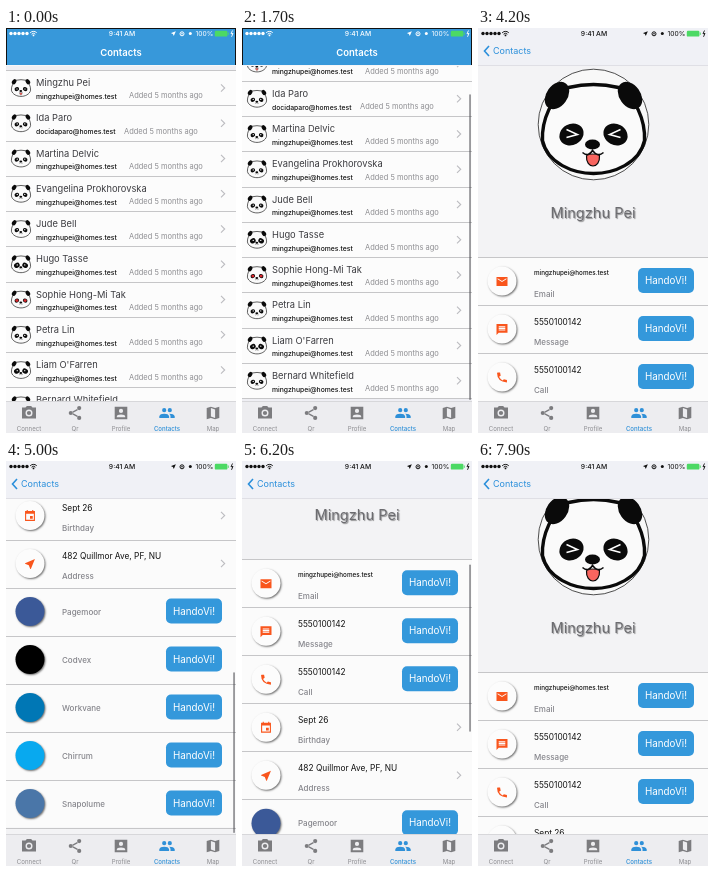
These frames come from a looping animation (230x405 px, 8000 ms). An HTML page with a canvas:

```html
<!DOCTYPE html>
<html lang="en">
<head>
<meta charset="utf-8">
<title>Contacts</title>
<style>
  html, body { margin: 0; width: 100%; height: 100%; overflow: hidden; background: #fff; }
  canvas { display: block; width: 230px; height: 405px; }
</style>
</head>
<body>
<canvas id="stage"></canvas>
<script>
const W = 230, H = 405, TOP = 38, BOTTOM = 373, VIEW = BOTTOM - TOP, LOOP = 8000;
const BLUE = '#3498db', ORANGE = '#f9551c', INK = '#0a0a0a';
const canvas = document.getElementById('stage');
const ctx = canvas.getContext('2d');
const dpr = window.devicePixelRatio || 1;
canvas.width = W * dpr;
canvas.height = H * dpr;

const ICONS = {
  camera: 'M9 2 7 4H2V20H22V4H17L15 2ZM7 12a5 5 0 1 0 10 0a5 5 0 1 0-10 0ZM9 12a3 3 0 1 0 6 0a3 3 0 1 0-6 0Z',
  share: 'M3 12a3 3 0 1 0 6 0a3 3 0 1 0-6 0ZM15 5a3 3 0 1 0 6 0a3 3 0 1 0-6 0ZM15 19a3 3 0 1 0 6 0a3 3 0 1 0-6 0ZM8.5 10 15 6.3 15.9 8 9.4 11.8ZM9.4 12.2 15.9 16 15 17.7 8.5 14Z',
  account: 'M3 3H21V21H3ZM9 9a3 3 0 1 0 6 0a3 3 0 1 0-6 0ZM6 18V17Q6 14 12 14T18 17V18Z',
  people: 'M5 8a3 3 0 1 0 6 0a3 3 0 1 0-6 0ZM13 8a3 3 0 1 0 6 0a3 3 0 1 0-6 0ZM1 19V16.5Q2 13 8 13T15 16.5V19ZM17 19V16.5Q17 14 15 13Q22 13 23 16.5V19Z',
  map: 'M3 5 9 3 15 5 21 3V19L15 21 9 19 3 21ZM9 5V17L15 19V7Z',
  mail: 'M2 4H22V20H2ZM4 6V8L12 13 20 8V6L12 11Z',
  message: 'M2 2H22V18H6L2 22ZM6 6V8H18V6ZM6 9V11H18V9ZM6 12V14H18V12Z',
  phone: 'M4 3H8.5L9.6 8.6 6.6 10.8Q9 15.3 13.2 17.4L15.4 15.2 21 16.5V21Q3 20 3 4Z',
  event: 'M6 1H8V3H16V1H18V3H21V21H3V3H6ZM5 8V19H19V8ZM12 12H17V17H12Z',
  near: 'M21 3 3 10.5V11.5L9.8 14.2 12.5 21H13.5Z'
};
const HEAD = new Path2D('M-25-37Q0-43 25-37C42-28 52-4 51 16C46 39 20 49 0 49C-20 49-46 39-51 16C-52-4-42-28-25-37Z');

const MAIL = 'mingzhupei@homes.test';
const PEOPLE = [
  ['Mingzhu Pei', 'wink'], ['Ida Paro', 'plain'], ['Martina Delvic', 'plain'],
  ['Evangelina Prokhorovska', 'plain'], ['Jude Bell', 'plain'], ['Hugo Tasse', 'big'],
  ['Sophie Hong-Mi Tak', 'red'], ['Petra Lin', 'plain'], ["Liam O'Farren", 'big'],
  ['Bernard Whitefield', 'plain']
];
const DETAILS = [
  { icon: 'mail', value: MAIL, label: 'Email', size: 6.3, button: true },
  { icon: 'message', value: '5550100142', label: 'Message', button: true },
  { icon: 'phone', value: '5550100142', label: 'Call', button: true },
  { icon: 'event', value: 'Sept 26', label: 'Birthday' },
  { icon: 'near', value: '482 Quillmor Ave, PF, NU', label: 'Address' },
  { color: '#3b5998', label: 'Pagemoor', button: true },
  { color: '#000', label: 'Codvex', button: true },
  { color: '#0077b5', label: 'Workvane', button: true },
  { color: '#08a9ef', label: 'Chirrum', button: true },
  { color: '#4a76a8', label: 'Snapolume', button: true }
];
const TABS = [['camera', 'Connect'], ['share', 'Qr'], ['account', 'Profile'], ['people', 'Contacts'], ['map', 'Map']];

const LIST_Y = 49, LIST_ROW = 35.25, INFO_Y = 229, INFO_ROW = 48;
const LIST_KEYS = [[0, 7], [500, 0], [800, 0], [1500, 31.5], [2000, 31.5], [2600, 0]];
const INFO_KEYS = [[4250, 0], [5000, 342.5], [5300, 336], [5600, 336], [6603, 18]];

const clamp = v => Math.max(0, Math.min(1, v));
const smooth = p => p * p * (3 - 2 * p);

function track(keys, t) {
  let value = keys[0][1];
  for (let i = 1; i < keys.length; i++) {
    const [a, from] = keys[i - 1], [b, to] = keys[i];
    if (t >= a) value = from + (to - from) * smooth(clamp((t - a) / (b - a)));
  }
  return value;
}

// Visible between a and b with a short fade at the end.
const flash = (t, a, b) => t < a ? 0 : clamp((b - t) / 200);

function text(str, x, y, size, color, weight = 400, align = 'left') {
  ctx.font = `${weight} ${size}px Inter, "Liberation Sans", sans-serif`;
  ctx.textAlign = align;
  ctx.fillStyle = color;
  ctx.fillText(str, x, y);
}

function rect(x, y, w, h, color) {
  ctx.fillStyle = color;
  ctx.fillRect(x, y, w, h);
}

function oval(x, y, rx, ry, color, angle = 0) {
  ctx.beginPath();
  ctx.ellipse(x, y, rx, ry, angle, 0, Math.PI * 2);
  ctx.fillStyle = color;
  ctx.fill();
}

function box(x, y, w, h, r, color) {
  ctx.beginPath();
  ctx.roundRect(x, y, w, h, r);
  ctx.fillStyle = color;
  ctx.fill();
}

function line(points, color, width) {
  ctx.beginPath();
  points.forEach(([x, y]) => ctx.lineTo(x, y));
  ctx.strokeStyle = color;
  ctx.lineWidth = width;
  ctx.stroke();
}

function icon(name, x, y, scale, color) {
  ctx.save();
  ctx.translate(x, y);
  ctx.scale(scale, scale);
  ctx.translate(-12, -12);
  ctx.fillStyle = color;
  ctx.fill(new Path2D(ICONS[name]), 'evenodd');
  ctx.restore();
}

const chevron = (x, y) => line([[x - 2, y - 3.6], [x + 1.7, y], [x - 2, y + 3.6]], '#bcbcc0', 1.1);
const separator = y => rect(0, Math.round(y), W, 1, '#c6c6c8');

function panda(x, y, scale, mood) {
  ctx.save();
  ctx.translate(x, y);
  ctx.scale(scale, scale);
  ctx.fillStyle = '#fafafa';
  ctx.fill(HEAD);
  ctx.strokeStyle = INK;
  ctx.lineWidth = 3.4;
  ctx.stroke(HEAD);
  const grow = mood === 'big' ? 1.25 : 1;
  for (const s of [-1, 1]) {
    oval(36.5 * s, -29, 15, 10.5, INK, s * 0.94);
    oval(22 * s, 10, 12.5 * grow, 10.5 * grow, INK, s * 0.5);
    if (mood === 'wink') line([[27 * s, 5], [16 * s, 10], [27 * s, 13]], '#fff', 1.5);
    else if (mood === 'red') oval(22 * s, 10, 8, 7, '#d8262c');
    else oval(20 * s, 8, 3.5, 3.5, '#fff');
  }
  oval(-1, 20, 7.5, 5, INK);
  ctx.beginPath();
  ctx.moveTo(-11, 28);
  ctx.quadraticCurveTo(-5, 33, -1, 26);
  ctx.quadraticCurveTo(4, 33, 10, 28);
  ctx.strokeStyle = INK;
  ctx.lineWidth = 1.6;
  ctx.stroke();
  if (mood === 'wink') {
    ctx.beginPath();
    ctx.moveTo(-7, 31);
    ctx.quadraticCurveTo(-1, 28, 6, 31);
    ctx.bezierCurveTo(7, 45, -8, 45, -7, 31);
    ctx.fillStyle = '#f8655f';
    ctx.fill();
    ctx.lineWidth = 1.2;
    ctx.stroke();
  }
  ctx.restore();
}

function scrollbar(scroll, content, alpha) {
  if (!alpha) return;
  const max = content - VIEW;
  const over = Math.max(0, -scroll, scroll - max);
  const len = VIEW * VIEW / content - over;
  const y = TOP + 1 + clamp(scroll / max) * (VIEW - 2 - len);
  box(227.2, y, 1.7, len, 0.8, `rgba(70,70,75,${0.6 * alpha})`);
}

function drawList(t) {
  const scroll = track(LIST_KEYS, t);
  const top = LIST_Y - scroll;
  rect(0, TOP, W, VIEW, '#efeff4');
  rect(0, top, W, LIST_ROW * PEOPLE.length, '#fcfcfc');
  separator(top);
  PEOPLE.forEach(([name, mood], i) => {
    const y = top + i * LIST_ROW;
    const second = i === 1;
    panda(15, y + 17.2, 0.188, mood);
    text(name, 30, y + 16.2, 9.3, '#3c3c40');
    text(second ? 'docidaparo@homes.test' : MAIL, 30, y + 28.8, 6.8, '#111', 500);
    text('Added 5 months ago', second ? 118 : 123, y + 28.4, 7.5, '#8e8e92');
    chevron(217, y + 18);
    separator(y + LIST_ROW);
  });
  scrollbar(scroll, LIST_Y - TOP + LIST_ROW * PEOPLE.length, flash(t, 800, 2750));
}

function drawRow(row, y) {
  ctx.save();
  ctx.shadowColor = 'rgba(0,0,0,.55)';
  ctx.shadowBlur = 2 * dpr;
  ctx.shadowOffsetX = ctx.shadowOffsetY = dpr;
  oval(24, y + 24, 14.5, 14.5, row.color || '#fcfcfc');
  ctx.restore();
  if (row.icon) {
    icon(row.icon, 24, y + 24.5, 0.55, ORANGE);
    text(row.value, 56, y + (row.size ? 17.6 : 19.6), row.size || 8.3, '#111', row.size ? 500 : 400);
  }
  text(row.label, 56, y + (row.icon ? 39.8 : 27), 8, '#85858b', 500);
  if (row.button) {
    box(160, y + 11, 56, 25, 5, BLUE);
    text('HandoVi!', 188, y + 27.2, 9.8, '#fff', 400, 'center');
  } else chevron(217, y + 24);
  separator(y + INFO_ROW);
}

function drawInfo(t) {
  const scroll = track(INFO_KEYS, t);
  const top = INFO_Y - scroll;
  rect(0, TOP, W, VIEW, '#f3f3f5');
  rect(0, top, W, INFO_ROW * DETAILS.length, '#fbfbfb');
  ctx.beginPath();
  ctx.arc(115.5, 96.5 - scroll, 55.3, 0, Math.PI * 2);
  ctx.fillStyle = '#f8f8f8';
  ctx.fill();
  ctx.strokeStyle = '#222';
  ctx.lineWidth = 0.8;
  ctx.stroke();
  panda(115.5, 96.5 - scroll, 1, 'wink');
  ctx.save();
  ctx.shadowColor = 'rgba(0,0,0,.4)';
  ctx.shadowBlur = dpr;
  ctx.shadowOffsetX = ctx.shadowOffsetY = dpr;
  text(PEOPLE[0][0], 115, 190 - scroll, 14.6, '#6c6c70', 400, 'center');
  ctx.restore();
  separator(top);
  DETAILS.forEach((row, i) => drawRow(row, top + i * INFO_ROW));
  scrollbar(scroll, INFO_Y - TOP + INFO_ROW * DETAILS.length, flash(t, 4300, 7000));
}

function statusBar(color) {
  for (let i = 0; i < 5; i++) oval(5 + i * 4, 5.5, 1.7, 1.7, color);
  ctx.strokeStyle = color;
  ctx.lineWidth = 1;
  for (const r of [2.6, 4.6]) {
    ctx.beginPath();
    ctx.arc(27.5, 8, r, -Math.PI * 0.76, -Math.PI * 0.24);
    ctx.stroke();
  }
  oval(27.5, 7.4, 0.9, 0.9, color);
  text('9:41 AM', 116, 8.2, 6.8, color, 500, 'center');
  icon('near', 167.5, 5.5, 0.26, color);
  ctx.beginPath();
  ctx.arc(176, 5.8, 2, 0, Math.PI * 2);
  ctx.stroke();
  oval(176, 5.8, 0.8, 0.8, color);
  oval(184.3, 5.6, 1.5, 1.5, color);
  text('100%', 207.3, 8.2, 6.7, color, 400, 'right');
  box(208.8, 2.8, 12.6, 5.8, 1.2, '#4cd964');
  rect(221.8, 4.5, 0.9, 2.4, '#4cd964');
  line([[226.5, 2.5], [225, 5.8], [227, 5.4], [225.5, 8.8]], color, 0.9);
}

function header(push) {
  if (push < 1) {
    rect(0, 0, W, TOP, '#111');
    rect(1, 1, W - 2, TOP - 2, '#3798da');
    rect(0, TOP - 1, W, 1, '#f6f6f8');
    text('Contacts', 115, 28.2, 9.5, '#fff', 600, 'center');
    statusBar('#fff');
  }
  if (push > 0) {
    ctx.save();
    ctx.globalAlpha = push;
    rect(0, 0, W, TOP, '#f0f1f6');
    rect(0, TOP - 1, W, 0.6, '#d4d4da');
    line([[11, 18], [6.5, 23], [11, 28]], '#2a8fdb', 1.6);
    text('Contacts', 15, 26.3, 9, '#2a8fdb');
    statusBar('#111');
    ctx.restore();
  }
}

function tabBar() {
  rect(0, BOTTOM, W, H - BOTTOM, '#ededf0');
  rect(0, BOTTOM, W, 0.7, '#cfcfd2');
  TABS.forEach(([name, label], i) => {
    const x = 23 + i * 46, active = i === 3;
    icon(name, x, 385, 0.7, active ? '#2f90d8' : '#7c7c7f');
    text(label, x, 402.8, 6.1, active ? '#2f90d8' : '#8c8c90', active ? 500 : 400, 'center');
  });
}

function draw(now) {
  const t = Math.floor((now % LOOP) / 100) * 100;
  const push = 1 - (1 - clamp((t - 3250) / 450)) ** 3;
  ctx.setTransform(dpr, 0, 0, dpr, 0, 0);
  rect(0, 0, W, H, '#fff');
  if (push < 1) {
    ctx.save();
    ctx.translate(-70 * push, 0);
    drawList(t);
    ctx.restore();
  }
  if (push > 0) {
    ctx.save();
    ctx.translate(W * (1 - push), 0);
    drawInfo(t);
    ctx.restore();
  }
  header(push);
  tabBar();
}

const start = performance.now();
function tick() {
  draw(performance.now() - start);
  requestAnimationFrame(tick);
}
tick();
</script>
</body>
</html>
```
